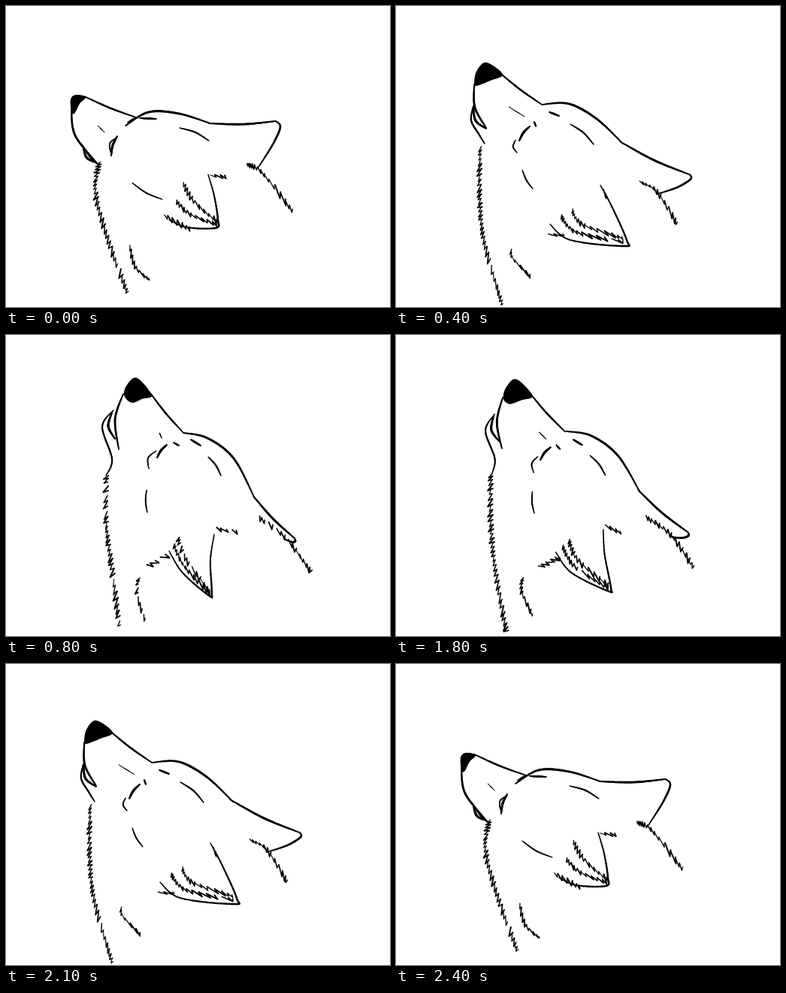
These frames come from a looping animation (511x400 px, 2500 ms). An HTML page with a canvas:

```html
<!DOCTYPE html>
<html>
<head>
<meta charset="utf-8">
<style>
html, body { margin: 0; width: 100%; height: 100%; overflow: hidden; background: #fff; }
canvas { display: block; }
</style>
</head>
<body>
<canvas id="stage" width="511" height="400"></canvas>
<script>
const ctx = document.getElementById('stage').getContext('2d');

// Every shape is given with the head low, half raised and fully raised.
const shape = (...rows) => rows.map(r => r.split(' ').map(p => p.split(',').map(Number)));

const nose = shape(
  '87,140 86,124 93,118 106,121 98,130 91,143',
  '104,104 107,87 120,75 142,91 126,99 108,106',
  '157,80 161,66 174,57 194,80 181,85 167,90');
const nearEar = shape(
  '217,284 240,294 279,295 282,284 277,252 269,224',
  '205,290 232,311 303,319 307,311 288,268 272,238',
  '217,287 235,316 270,346 274,342 272,300 277,265');
const nearEarFur = shape(
  '235,235 250,260 279,285', '233,268 247,290 300,308', '228,270 240,300 270,339');

// [shape, line width]
const outlines = [
  [nearEar, 2.1],
  // forehead
  [shape('159,159 190,141 230,143 272,156', '194,131 230,130 267,150 302,183',
    '236,130 268,137 303,164 331,217'), 2.6],
  // far ear, lower edge
  [shape('359,153 365,161 355,184 336,214', '391,224 392,230 374,241 347,250',
    '384,270 385,274 380,275 370,271'), 2.3],
  // upper jaw and lower jaw
  [shape('87,137 92,172 122,210', '104,104 105,135 120,162', '156,78 145,112 150,152'), 2.4],
  [shape('101,184 108,195 115,204 123,211', '103,132 100,152 110,170 118,183',
    '143,100 128,122 141,165 133,187'), 2]
];

// [end points, line width, bend]
const marks = [
  [shape('104,120 173,148', '137,88 194,131', '191,76 236,130'), 2.1, 0.02],     // muzzle
  [shape('270,156 359,153', '298,180 391,224', '329,214 384,270'), 2.5, 0.03],   // far ear, upper edge
  [shape('103,189 120,208', '103,135 120,163', '141,103 145,138'), 2.6, 0.2],    // mouth
  [shape('168,235 208,257', '168,218 182,243', '187,206 188,236'), 1.6, 0.06],   // cheek
  [shape('231,162 270,179', '232,157 263,184', '269,162 286,187'), 1.8, -0.07],  // brow
  [shape('178,149 200,150', '204,141 217,146', '246,139 259,147'), 2.2, 0],
  [shape('162,155 171,149', '184,154 186,160', '223,143 230,147'), 1.8, 0],
  [shape('148,173 140,199', '178,160 164,179', '214,146 201,163'), 2.6, 0.08],   // eye
  [shape('147,175 139,194', '159,178 161,195', '200,154 190,178'), 1.5, 0.25],
  [shape('122,159 131,168', '150,134 171,147', '204,130 207,137'), 0.9, 0]
];

// [shape, tooth size]
const furs = [
  [shape('124,207 119,250 138,318 161,380', '112,183 111,250 117,313 141,396',
    '133,187 133,250 141,315 151,390'), 7],                                      // neck
  [shape('164,318 172,347 190,363', '153,320 155,335 177,358', '176,323 174,345 184,377'), 4],
  [shape('320,211 340,221 380,271', '321,233 346,246 373,288', '336,243 372,270 405,314'), 6],
  [shape('272,226 291,227', '273,240 280,254', '280,258 306,262'), 5],
  [shape('210,279 243,296', '198,305 222,304', '189,308 218,292'), 7],
  [nearEarFur, 6]
];

const noise = n => { const v = Math.sin(n * 127.1) * 43758.5; return v - Math.floor(v); };
const mix = (p, q) => p.map((v, k) => (v + q[k]) / 2);

// Quadratic motion through the three positions, lift from 0 to 2
const pose = ([a, b, c], lift) => a.map((p, i) => p.map((v, k) => {
  const w = b[i][k];
  return v + lift * (w - v + (lift - 1) / 2 * (c[i][k] - 2 * w + v));
}));

// Point on a Catmull-Rom spline, u from 0 to 1
function at(pts, u, closed) {
  const n = pts.length, spans = closed ? n : n - 1;
  const i = Math.min(spans - 1, Math.floor(u * spans)), f = u * spans - i;
  const get = k => closed ? pts[(k + n) % n] : pts[Math.max(0, Math.min(n - 1, k))];
  const [a, b, c, d] = [-1, 0, 1, 2].map(k => get(i + k));
  return [0, 1].map(k => b[k] + f / 2 * (c[k] - a[k] +
    f * (2 * a[k] - 5 * b[k] + 4 * c[k] - d[k] + f * (3 * (b[k] - c[k]) + d[k] - a[k]))));
}

function line(width, ...pts) {
  ctx.lineWidth = width;
  ctx.beginPath();
  for (const p of pts) ctx.lineTo(...p);
  ctx.stroke();
}

function fill(pts) {
  ctx.beginPath();
  for (let i = 0; i < 60; i++) ctx.lineTo(...at(pts, i / 60, true));
  ctx.fill();
}

// Brush line, thicker in the middle
function ink(pts, width) {
  const n = 36;
  for (let i = 0; i < n; i++) {
    line(width * (0.65 + 0.5 * Math.sin(Math.PI * (i + 0.5) / n)), at(pts, i / n), at(pts, (i + 1) / n));
  }
}

function mark([p, q], width, bend) {
  const [x, y] = mix(p, q);
  ink([p, [x - (q[1] - p[1]) * bend, y + (q[0] - p[0]) * bend], q], width);
}

// Uneven slanted teeth with a few gaps
function fur(pts, size, seed) {
  const length = pts.slice(1).reduce((s, p, i) => s + Math.hypot(p[0] - pts[i][0], p[1] - pts[i][1]), 0);
  const n = Math.max(3, Math.round(length / 6.5));
  for (let i = 0; i < n; i++) {
    const r = noise(i + seed * 31 + 1);
    if (r < 0.07) continue;
    const p = at(pts, i / n), q = at(pts, (i + 1) / n);
    const dx = q[0] - p[0], dy = q[1] - p[1], len = Math.hypot(dx, dy) || 1;
    const reach = size * (0.3 + 0.7 * r) / len / 2;
    const over = 0.1 + 0.6 * noise(i + seed * 17 + 5);
    line(1 + r, [p[0] + dy * reach, p[1] - dx * reach],
      [q[0] - dy * reach + dx * over, q[1] + dx * reach + dy * over],
      [q[0] + dy * reach, q[1] - dx * reach]);
  }
}

function draw(step) {
  const lift = step * (0.37 - 0.012 * step);
  ctx.fillStyle = '#fff';
  ctx.fillRect(0, 0, 511, 400);
  ctx.fillStyle = ctx.strokeStyle = '#000';
  ctx.lineCap = ctx.lineJoin = 'round';
  fill(pose(nose, lift));
  for (const [s, width] of outlines) ink(pose(s, lift), width);
  for (const [s, width, bend] of marks) mark(pose(s, lift), width, bend);
  for (const [s, size] of furs) fur(pose(s, lift), size, step);
  // second row of ear fur, half way to the rear edge
  const edge = pose(nearEar, lift);
  fur(pose(nearEarFur, lift).map((p, i) => mix(p, edge[i])), 5, step + 9);
}

// Raise in seven steps of 100 ms, hold, lower the same way
function frame() {
  const tick = Math.floor(performance.now() % 2500 / 100);
  draw(Math.max(0, Math.min(7, tick - 1, 24 - tick)));
  requestAnimationFrame(frame);
}
frame();
</script>
</body>
</html>
```
